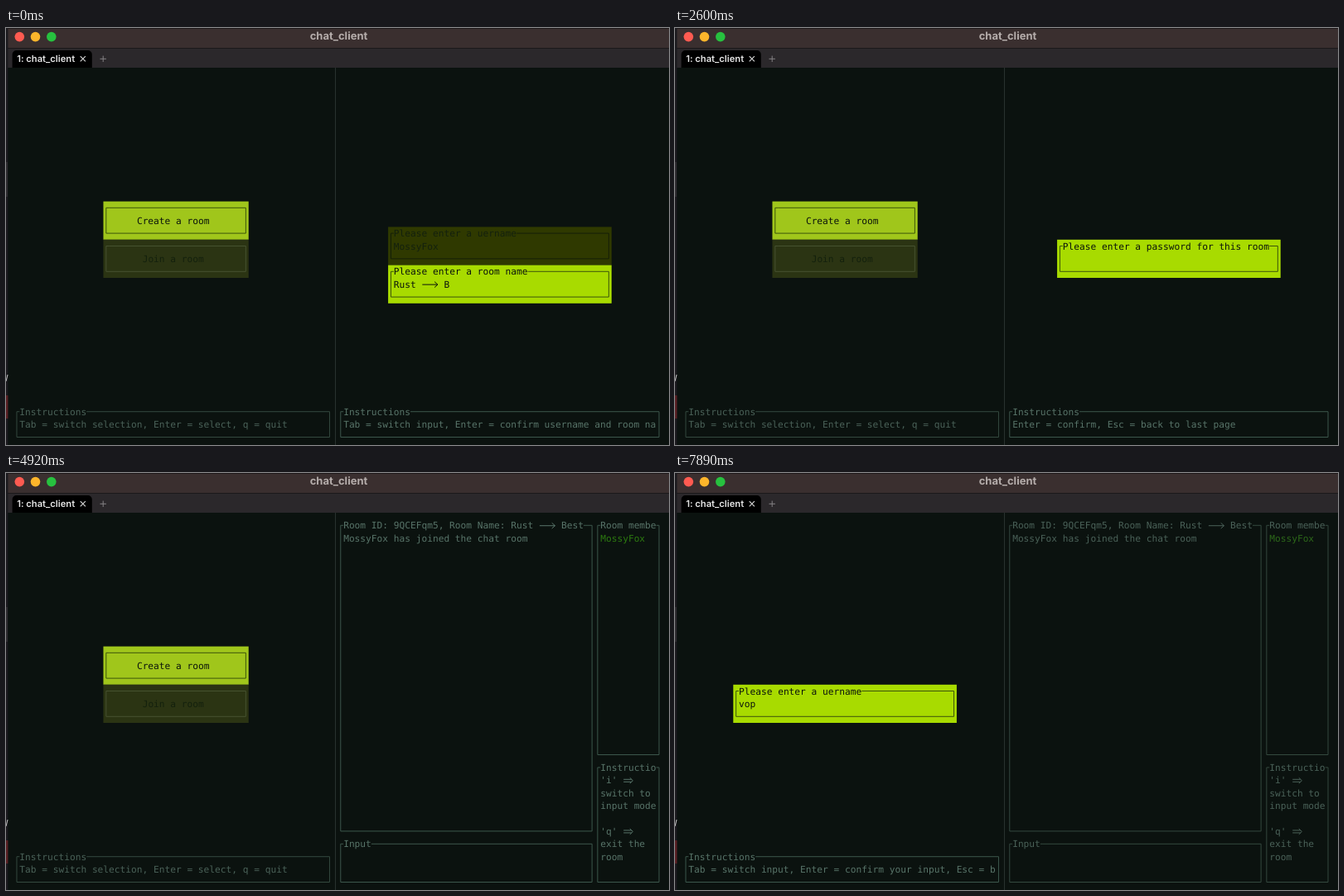
Recreate the animation shown at these times as an HTML page. Size 800x504 px, loop 7990 ms.

```html
<!DOCTYPE html>
<html lang="en">
<head>
<meta charset="utf-8">
<title>chat_client</title>
<style>
  html, body { margin: 0; width: 100%; height: 100%; overflow: hidden; background: #0b120f; }
  svg { display: block; width: 800px; height: 504px; }
  text { white-space: pre; text-rendering: geometricPrecision; }
  .term text { font: 11.2px "DejaVu Sans Mono", monospace; }
  .ui { font-family: Inter, sans-serif; }
</style>
</head>
<body>
<svg viewBox="0 0 800 504">
  <rect width="800" height="504" fill="#0b120f"/>
  <rect width="800" height="24" fill="#3a2f2f"/>
  <rect width="800" height="1" fill="#1d1819"/>
  <rect y="24" width="800" height="24" fill="#2b282b"/>
  <rect y="24" width="800" height="1" fill="#1b181a"/>
  <path d="M7.6 48V32a5 5 0 0 1 5-5H98.8a5 5 0 0 1 5 5V48Z" fill="#000"/>
  <circle cx="16.3" cy="10.6" r="5.8" fill="#ff5b51"/>
  <circle cx="35.5" cy="10.6" r="5.8" fill="#fdb52b"/>
  <circle cx="54.8" cy="10.6" r="5.8" fill="#27c13f"/>
  <g class="ui">
    <text x="401.5" y="14.4" font-size="13" font-weight="700" text-anchor="middle" fill="#b5adab">chat_client</text>
    <text x="13.2" y="41.4" font-size="11.2" font-weight="600" fill="#e6e6e6">1: chat_client</text>
  </g>
  <path d="M89.7 34.2l6.2 6.2m0-6.2l-6.2 6.2" stroke="#d8d8d8" stroke-width="1.1"/>
  <path d="M113.5 37.3h7.4m-3.7-3.7v7.4" stroke="#858285"/>
  <rect width="2.4" height="504" fill="#1b1a1e"/>
  <rect y="162" width="2" height="42" fill="#2e2c30"/>
  <rect y="444" width="2.4" height="28" fill="#5a2024"/>
  <path d="M0 427l2-8" stroke="#c8c8c8"/>
  <path d="M397.5 48V504" stroke="#28322f"/>
  <g class="term" id="term"></g>
</svg>
<script>
const LOOP = 7990, CW = 6.741, RH = 15.4, LEFT = 9.6, RIGHT = 400.4, TOP = 63.3;
const USER = 'MossyFox', GUEST = 'vop';
const INK = '#0b140c';
const THEMES = {
  on:  { text: '#587469', line: '#3c574c', lime: '#a8db00', dark: '#2f3900', name: '#2d7a10' },
  off: { text: '#4a6158', line: '#34493f', lime: '#a0c61b', dark: '#2b3413', name: '#2d681a' }
};
const ON_LIME = '#3c540a';
const term = document.getElementById('term');
const rowY = r => TOP + r * RH;

// The last value whose start time has passed.
const at = (t, steps) => steps.filter(s => t >= s[0]).pop()[1];

function pane(x0, theme) {
  const colX = c => x0 + c * CW;
  const p = { out: '', theme };

  p.text = (col, row, str, fill = theme.text) => {
    for (const part of str.split(/(-->|=>)/)) {
      const x = colX(col), y = rowY(row);
      if (part === '-->')
        p.out += `<path d="M${x + 0.8} ${y + 0.4}h18.6m-3.8-3.4l3.8 3.4l-3.8 3.4" fill="none" stroke="${fill}"/>`;
      else if (part === '=>')
        p.out += `<path d="M${x + 1} ${y - 1}h9.6m-9.6 3h9.6m-2-5l3.6 3.5l-3.6 3.5" fill="none" stroke="${fill}"/>`;
      else
        p.out += `<text x="${x}" y="${y + 4.1}" fill="${fill}">${part}</text>`;
      col += part.length;
    }
  };

  // Border through the cell centres, broken by the title.
  p.box = (c1, r1, c2, r2, title = '', line = theme.line, fill = theme.text) => {
    const l = colX(c1 + 0.5), r = colX(c2 + 0.5), t = rowY(r1), b = rowY(r2);
    const start = colX(c1 + 1), end = colX(c1 + 1 + title.length);
    p.out += `<path d="M${end} ${t}H${r}V${b}H${l}V${t}H${start}" fill="none" stroke="${line}"/>`;
    if (title) p.text(c1 + 1, r1, title, fill);
  };

  p.field = (col, row, cols, active, title, value, valueCol = col + 1, line) => {
    const fill = active ? INK : '#14210d';
    p.out += `<rect x="${colX(col)}" y="${rowY(row - 0.5)}" width="${cols * CW}" height="${3 * RH}" fill="${active ? theme.lime : theme.dark}"/>`;
    p.box(col, row, col + cols - 1, row + 2, title, line || (active ? ON_LIME : '#151f08'), fill);
    p.text(valueCol, row + 1, value, fill);
  };

  p.help = (right, str) => {
    p.box(0, 26, right, 28, 'Instructions');
    p.text(1, 27, str);
  };
  return p;
}

function menu(p, join) {
  const line = active => active ? ON_LIME : '#465230';
  p.field(16, 10, 26, !join, '', 'Create a room', 22, line(!join));
  p.field(16, 13, 26, join, '', 'Join a room', 23, line(join));
  p.help(56, 'Tab = switch selection, Enter = select, q = quit');
}

function joinForm(p, name) {
  p.field(9, 13, 40, true, 'Please enter a uername', name);
  p.help(56, 'Tab = switch input, Enter = confirm your input, Esc = b');
}

function createForm(p, room) {
  p.field(9, 12, 40, false, 'Please enter a uername', USER);
  p.field(9, 15, 40, true, 'Please enter a room name', room);
  p.help(57, 'Tab = switch input, Enter = confirm username and room na');
}

function passwordForm(p, pass) {
  p.field(9, 13, 40, true, 'Please enter a password for this room', pass);
  p.help(57, 'Enter = confirm, Esc = back to last page');
}

function chat(p) {
  p.box(0, 0, 45, 24, 'Room ID: 9QCEFqm5, Room Name: Rust --> Best');
  p.text(1, 1, USER + ' has joined the chat room');
  p.box(0, 25, 45, 28, 'Input');
  p.box(46, 0, 57, 18, 'Room membe');
  p.text(47, 1, USER, p.theme.name);
  p.box(46, 19, 57, 28, 'Instructio');
  ["'i' =>", 'switch to', 'input mode', '', "'q' =>", 'exit the', 'room']
    .forEach((s, i) => p.text(47, 20 + i, s));
}

function scene(t) {
  const leftOn = t >= 6130;
  const left = pane(LEFT, leftOn ? THEMES.on : THEMES.off);
  const right = pane(RIGHT, leftOn ? THEMES.off : THEMES.on);

  if (t < 7060) menu(left, t >= 6780);
  else joinForm(left, GUEST.slice(0, at(t, [[0, 0], [7610, 1], [7700, 2], [7800, 3]])));

  if (t < 1760)
    createForm(right, 'Rust --> ' + 'Best'.slice(0, at(t, [[0, 1], [280, 2], [370, 3], [460, 4]])));
  else if (t < 4550)
    passwordForm(right, 'Rust!'.slice(0, at(t, [[0, 0], [3900, 1], [3990, 3], [4090, 4], [4270, 5]])));
  else chat(right);

  return left.out + right.out;
}

let shown = '';
function draw() {
  const next = scene(performance.now() % LOOP);
  if (next !== shown) term.innerHTML = shown = next;
  requestAnimationFrame(draw);
}
draw();
</script>
</body>
</html>
```
